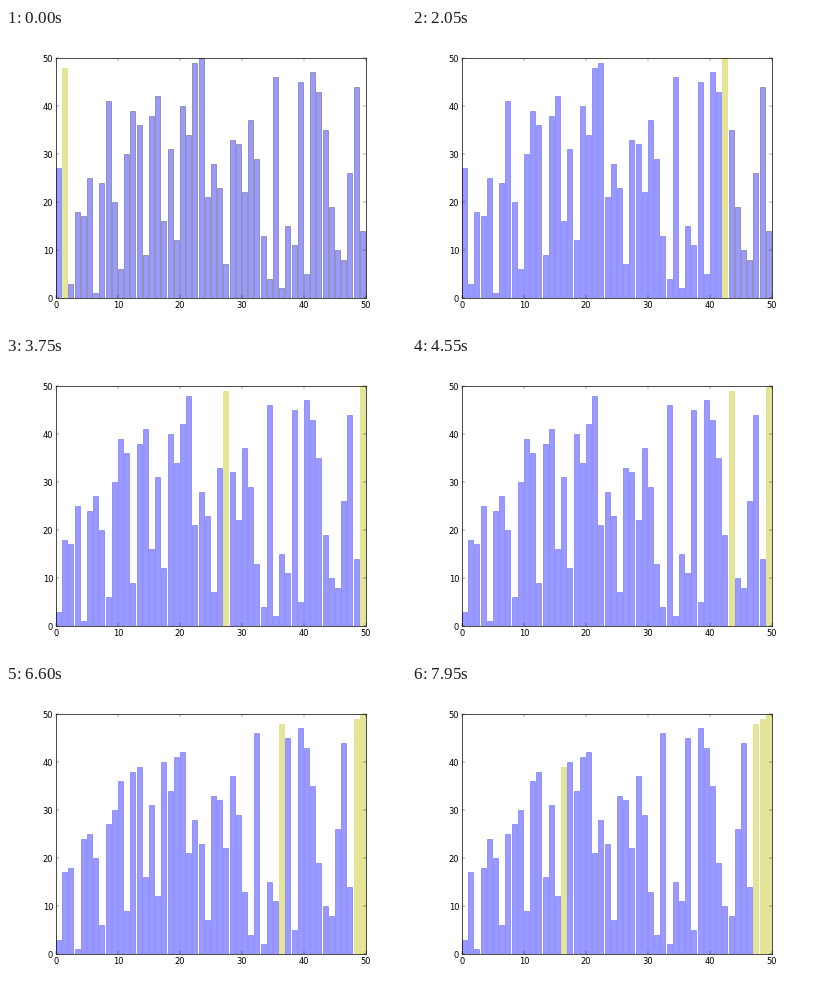
A matplotlib script for the animation above (8000 ms loop, 400 by 300 pixels).

```python
from itertools import islice

import matplotlib.pyplot as plt
from matplotlib.animation import FuncAnimation

FRAMES, INTERVAL = 160, 50

# The unsorted input: the numbers 1 to 50, shuffled.
START = [27, 48, 3, 18, 17, 25, 1, 24, 41, 20, 6, 30, 39, 36, 9, 38, 42,
         16, 31, 12, 40, 34, 49, 50, 21, 28, 23, 7, 33, 32, 22, 37, 29, 13,
         4, 46, 2, 15, 11, 45, 5, 47, 43, 35, 19, 10, 8, 26, 44, 14]
N = len(START)

plt.style.use("classic")
plt.rcParams.update({
    "font.family": "DejaVu Sans",
    "figure.facecolor": "white",
    "savefig.facecolor": "white",
    "savefig.dpi": "figure",
    "ytick.alignment": "center_baseline",
})


def bubble_sort(values):
    """Yield heights and (face, edge) colours after each comparison."""
    heights = list(values)
    colors = [("b", "k")] * N
    for end in range(N - 1, 0, -1):
        for j in range(end):
            heights[j:j + 2] = sorted(heights[j:j + 2])
            colors[j:j + 2] = ("b", "b"), ("y", "y")
            yield list(heights), list(colors)


steps = list(islice(bubble_sort(START), FRAMES))

fig, ax = plt.subplots(figsize=(8, 6), dpi=50)
bars = ax.bar(range(N), START, width=0.8, align="edge",
              color="b", edgecolor="k", linewidth=1, alpha=0.4)
ticks = range(0, N + 1, 10)
ax.set(xlim=(0, N), ylim=(0, N), xticks=ticks, yticks=ticks)


def draw(i):
    for bar, height, (face, edge) in zip(bars, *steps[i]):
        bar.set(height=height, facecolor=face, edgecolor=edge)
    return list(bars)


anim = FuncAnimation(fig, draw, frames=FRAMES, init_func=lambda: draw(0),
                     interval=INTERVAL, repeat=True, repeat_delay=0)
plt.show()
```
